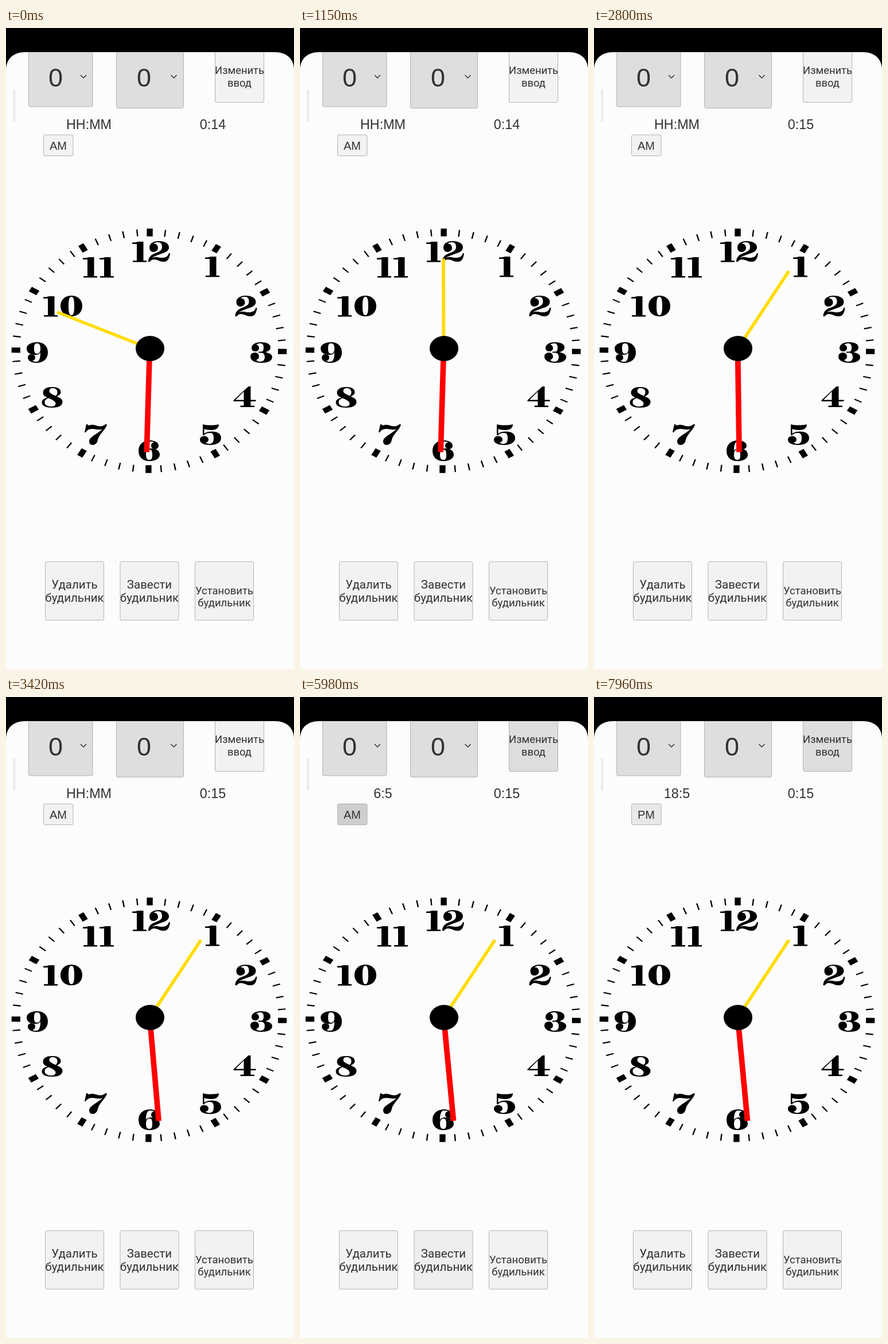
An HTML page for the animation above (8000 ms loop, 502x1116 px).

```html
<!DOCTYPE html>
<html lang="ru">
<head>
<meta charset="utf-8">
<title>Будильник</title>
<style>
  html, body { margin: 0; width: 100%; height: 100%; overflow: hidden; background: #000; }
  svg { display: block; width: 100vw; height: 100vh; }
  text { fill: #323232; text-anchor: middle; font-family: "Liberation Sans", Arial, sans-serif; }
  .ru { font-family: Roboto, sans-serif; }
  .box { stroke: #b2b2b2; stroke-width: 1; }
</style>
</head>
<body>
<svg id="stage" viewBox="0 0 502 1116">
  <rect width="502" height="1116" fill="#000"/>
  <path d="M0 1116V73C0 53 14 42 33 42H469C488 42 502 53 502 73V1116Z" fill="#fcfcfc"/>
  <rect x="12" y="107" width="4.5" height="56" rx="2" fill="#ededed"/>
  <clipPath id="screen"><rect y="42" width="502" height="1074"/></clipPath>
  <g id="controls" clip-path="url(#screen)"></g>
  <g id="dial"></g>
  <g id="hands"></g>
  <ellipse cx="251" cy="558" rx="25" ry="22"/>
</svg>
<script>
const LOOP = 8000, ASPECT = 1.127;
const byId = id => document.getElementById(id);

function add(parent, tag, attrs, content) {
  const el = document.createElementNS('http://www.w3.org/2000/svg', tag);
  for (const key in attrs) el.setAttribute(key, attrs[key]);
  if (content !== undefined) el.textContent = content;
  parent.appendChild(el);
  return el;
}

const controls = byId('controls');
const box = (x, y, width, height, fill = '#f2f2f2') =>
  add(controls, 'rect', { x, y, width, height, rx: 2.5, fill, class: 'box' });
const label = (x, y, size, content, cls = '') =>
  add(controls, 'text', { x, y, 'font-size': size, class: cls }, content);

function dropdown(x, width, bottom, zeroX, arrowX) {
  box(x, 30, width, bottom - 30, '#dedede');
  label(zeroX, 101.5, 45, '0');
  add(controls, 'path', { d: `M${arrowX - 5} 82l5 5l5 -5`, fill: 'none', stroke: '#323232', 'stroke-width': 1.5 });
}

function button(x, y, width, height, size, lines, baselines) {
  const rect = box(x, y, width, height);
  lines.forEach((line, i) => label(x + width / 2, baselines[i], size, line, 'ru'));
  return rect;
}

dropdown(39.5, 111.5, 137, 86.5, 135);
dropdown(192.5, 117, 139.5, 240.5, 292.5);
const editButton = button(364.5, 30, 85, 99.5, 18.4, ['Изменить', 'ввод'], [80, 102]);
const alarmText = label(144.5, 175.5, 23.3, '');
const clockText = label(360.5, 175.5, 23.3, '');
const halfButton = box(65.5, 186, 51.5, 36.5);
const halfText = label(91, 212, 20, '');
button(68.5, 929, 102, 102, 20.5, ['Удалить', 'будильник'], [976, 999]);
const startButton = button(199, 929, 102, 102, 20.5, ['Завести', 'будильник'], [976, 999]);
button(329.5, 929, 102, 102, 18.5, ['Установить', 'будильник'], [986, 1007]);

// Fat-face numerals on a 36-unit height
const SIX = 'M19 36C7 36 0 29 0 18C0 7 8 0 20 0C29 0 35 4 35 9C35 13 32 15 29 15C25 15 22 13 22 9.5C22 6 24 4 27 3.5C25 2 23 2 20 2C15 2 13 8 13 18C15 15 18 14 22 14C31 14 37 18 37 25C37 32 29 36 19 36ZM19 34C23 34 24 31 24 25C24 19 23 16 19 16C15 16 13 19 13 25C13 31 15 34 19 34Z';
const GLYPHS = {
  0: 'M19 0C30 0 38 7 38 18S30 36 19 36S0 29 0 18S8 0 19 0ZM19 2C15 2 14 8 14 18S15 34 19 34S24 28 24 18S23 2 19 2Z',
  1: 'M0 1.5Q6 1.5 10 0H19.5V33H25V35.5H1V33H8V4H0Z',
  2: 'M2 11C2 4 9 0 18 0C29 0 36 4 36 11C36 17 30 20 20 23C13 25.5 9 27 7 29C14 26 18 29 24 29C30 29 34 27 36 21H38C37 30 34 36 27 36C19 36 17 32 10 32C6 32 4 34 3 36H0C0 27 6 23 15 20C22 17 24 15 24 10C24 5 22 2 17 2C13 2 10 3 10 5C14 4 17 8 17 12C17 16 13 19 9 19C5 19 2 16 2 11Z',
  3: 'M2 10C2 4 9 0 18 0C28 0 35 3 35 9C35 14 31 16 26 17.5C33 19 38 21 38 26C38 33 29 36 19 36C8 36 0 32 0 25C0 21 3 18 8 18C12 18 15 21 15 25C15 28 13 30 10 31C12 33 14 34 17 34C22 34 25 31 25 26C25 21 23 18.5 18 18.5H14V16.5H18C22 16.5 23 14 23 9.5C23 4 21 2 17 2C14 2 12 3 10.5 4C13 5 15 7 15 10C15 14 12 16 8.5 16C5 16 2 14 2 10Z',
  4: 'M26 0H30V23.5H39V26H30V33.5H36.5V36H12V33.5H18V26H0V24ZM18 9L3.5 23.5H18Z',
  5: 'M5 0C13 2 24 2 33 0C33 6 29 10 20 10C14 10 10 9 7.5 8V16C11 13.5 16 12.5 21 12.5C30 12.5 37 16 37 24C37 32 28 36 18 36C8 36 0 33 0 27C0 23 3 20.5 7.5 20.5C12 20.5 15 23 15 27C15 29 13 31 10 32C12 33.5 14 34 17 34C22 34 24 30 24 24C24 18 22 15 18 15C13 15 9 16.5 7.5 19H5Z',
  6: SIX,
  7: 'M3 0H5C6 2 8 2 11 1C15 0 19 2 23 3C29 4 33 3 36 0H39C38 8 25 17 23 27C22 33 18 36 14 36C10 36 8 33 8 30C8 22 20 18 32 8C26 11 20 8 14 8C8 8 4 10 2 14H0Z',
  8: 'M18 0C27 0 33 3 33 9C33 13 29 15 26 16.5C32 19 36 21 36 26C36 33 28 36 18 36C7 36 0 33 0 27C0 22 4 20 10 18.5C5 17 2 14 2 10C2 3 9 0 18 0ZM19 2C15 2 13 4 13 7C13 11 19 13 24 15.5C26 14 27 12 27 9C27 5 24 2 19 2ZM12 19.5C7 21 5 23 5 27C5 31 10 34 16 34C21 34 24 32 24 29C24 25 18 22 12 19.5Z',
  9: SIX
};

const dial = byId('dial');
function digit(n, x, y) {
  const turn = n === 9 ? ' rotate(180 18.5 18)' : '';
  add(dial, 'path', { d: GLYPHS[n], 'fill-rule': 'evenodd', transform: `translate(${x} ${y})${turn}` });
}
[
  [1, 220, 372], [2, 248, 371], [1, 347, 398], [2, 399.5, 466], [3, 426, 547],
  [4, 396.5, 624], [5, 338, 690], [6, 231, 718], [7, 137, 690], [8, 62.5, 625],
  [9, 36, 547], [1, 65, 467], [0, 95, 466], [1, 134, 399], [1, 163, 399]
].forEach(d => digit(...d));

const ring = add(dial, 'g', { transform: `translate(249.5 562) rotate(.3) scale(${ASPECT} 1)` });
for (let minute = 0; minute < 60; minute++) {
  const major = minute % 5 === 0;
  const width = major ? 9.2 : 2.1, height = major ? 13.5 : 12;
  add(ring, 'rect', {
    x: -width / 2, y: -206 - height / 2, width, height,
    transform: `rotate(${minute * 6 + (major ? 0 : 0.6)})`
  });
}

const pivot = add(byId('hands'), 'g', { transform: `translate(250.5 558) scale(${ASPECT} 1)` });
const hand = (length, width, fill) =>
  add(pivot, 'rect', { x: -width / 2, y: -length, width, height: length, fill });
const minuteHand = hand(156.5, 5.2, '#ffdc00');
const hourHand = hand(180.5, 8.6, '#ff0000');

// Linear interpolation through [time, value] keys
function track(keys, t) {
  const i = keys.findIndex(k => k[0] > t);
  if (i === 0) return keys[0][1];
  if (i < 0) return keys[keys.length - 1][1];
  const [t0, a] = keys[i - 1], [t1, b] = keys[i];
  return a + (b - a) * (t - t0) / (t1 - t0);
}
const MINUTE = [[0, -66.2], [1150, -0.2], [2020, 27.3], [2280, 30.4]];
const HOUR = [[2480, 181.5], [3320, 175.7], [3420, 175.6], [3520, 175.2]];
const START = [[4300, 242], [4400, 204], [4580, 204], [4680, 238], [5980, 238], [6080, 242]];
const HALF = [[5870, 242], [5970, 206], [6080, 206], [6180, 232]];
const EDIT = [[4580, 242], [4680, 222]];

function shade(rect, keys, t) {
  const v = Math.round(track(keys, t));
  rect.setAttribute('fill', `rgb(${v},${v},${v})`);
}

function draw(t) {
  minuteHand.setAttribute('transform', `rotate(${track(MINUTE, t)})`);
  hourHand.setAttribute('transform', `rotate(${track(HOUR, t)})`);
  shade(startButton, START, t);
  shade(halfButton, HALF, t);
  shade(editButton, EDIT, t);
  alarmText.textContent = t < 4580 ? 'HH:MM' : t < 6080 ? '6:5' : '18:5';
  halfText.textContent = t < 6080 ? 'AM' : 'PM';
  clockText.textContent = t < 2700 ? '0:14' : '0:15';
}

const begin = performance.now();
function tick() {
  draw((performance.now() - begin) % LOOP);
  requestAnimationFrame(tick);
}
draw(0);
requestAnimationFrame(tick);
</script>
</body>
</html>
```
